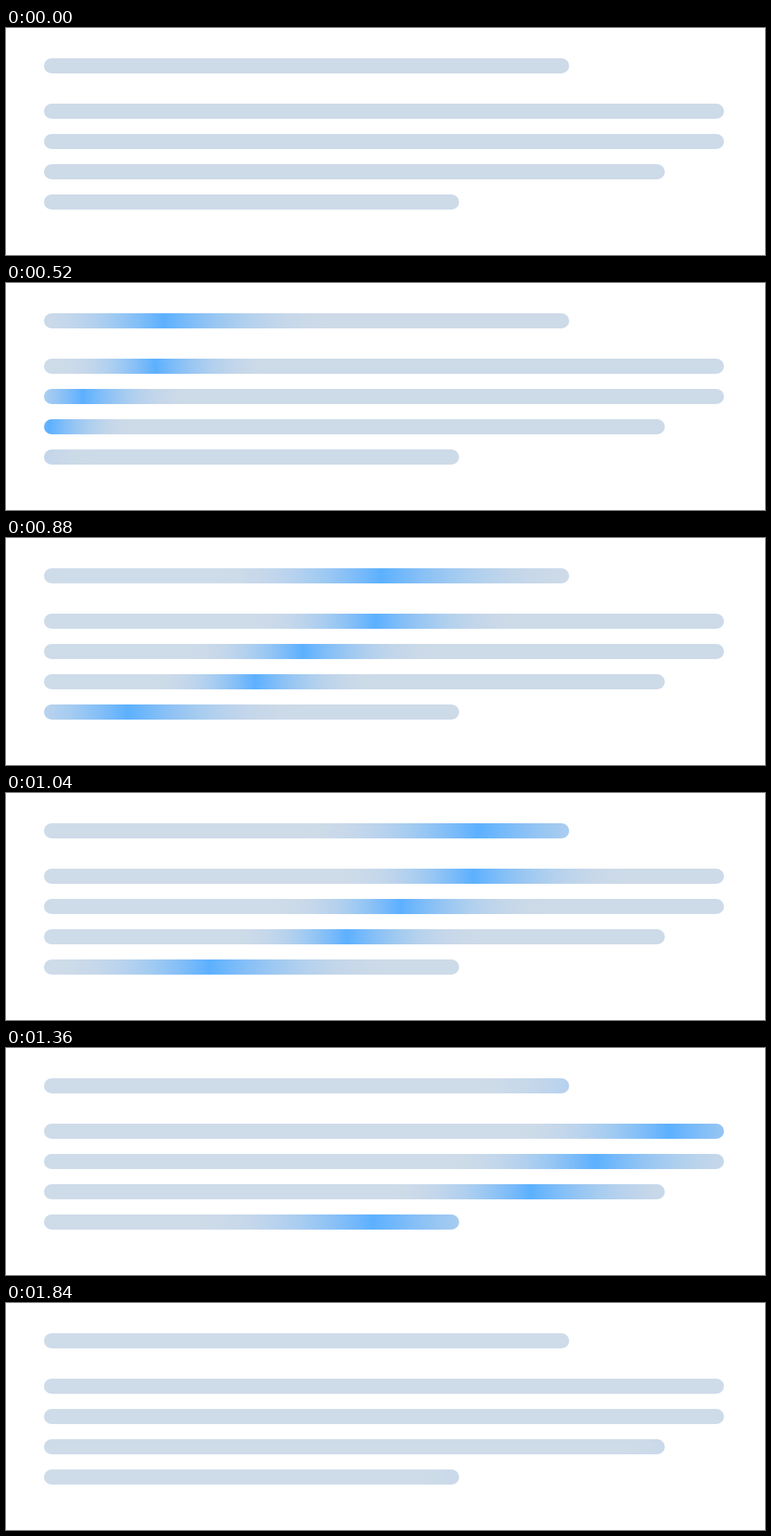
Recreate the animation shown at these times as an HTML page with a canvas. Size 1000 by 300 pixels, loop 2320 ms.

```html
<!DOCTYPE html>
<html>
<head>
<meta charset="utf-8">
<title>Loading placeholder</title>
<style>
html, body { margin: 0; width: 100%; height: 100%; overflow: hidden; background: #fff; }
canvas { display: block; }
</style>
</head>
<body>
<canvas id="stage" width="1000" height="300"></canvas>
<script>
const ctx = document.getElementById('stage').getContext('2d');
const LOOP = 2320, STEP = 40, START = 200, END = 1840;
const BASE = [205, 218, 232], TRAIL = [206, 219, 233], GLOW = [92, 176, 255];

// Glow centre = x0 + speed * t, glow reach = r0 + growth * t (t in ms)
const bars = [
  { y: 40,  w: 692, x0: -207, speed: .797, r0: 160, growth: .104 },
  { y: 100, w: 896, x0: -222, speed: .805, r0: 96,  growth: .104 },
  { y: 140, w: 896, x0: -317, speed: .804, r0: 85,  growth: .101 },
  { y: 180, w: 818, x0: -336, speed: .755, r0: 48,  growth: .122 },
  { y: 220, w: 547, x0: -432, speed: .673, r0: 146, growth: .09 }
];

const rgb = c => `rgb(${c.map(Math.round)})`;
const mix = (a, b, k) => rgb(a.map((v, i) => v + (b[i] - v) * k));

function shimmer(bar, t) {
  const x = bar.x0 + bar.speed * t;
  const right = bar.r0 + bar.growth * t, left = right * .85;
  const mid = left / (left + right);
  const fill = ctx.createLinearGradient(x - left, 0, x + right, 0);
  // Quadratic falloff on both sides of the peak
  for (let i = 0; i <= 10; i++) {
    const u = i / 10;
    fill.addColorStop(mid * u, mix(TRAIL, GLOW, u * u));
  }
  for (let i = 9; i >= 0; i--) {
    const u = i / 10;
    fill.addColorStop(1 - (1 - mid) * u, mix(BASE, GLOW, u * u));
  }
  return fill;
}

function draw(now) {
  const time = Math.floor((now % LOOP) / STEP) * STEP;
  const t = Math.min(time, END);
  ctx.fillStyle = '#fff';
  ctx.fillRect(0, 0, 1000, 300);
  for (const bar of bars) {
    ctx.fillStyle = t < START ? rgb(BASE) : shimmer(bar, t);
    ctx.beginPath();
    ctx.roundRect(50, bar.y, bar.w, 20, 10);
    ctx.fill();
  }
}

const begin = performance.now();
function frame() {
  draw(performance.now() - begin);
  requestAnimationFrame(frame);
}
frame();
</script>
</body>
</html>
```
